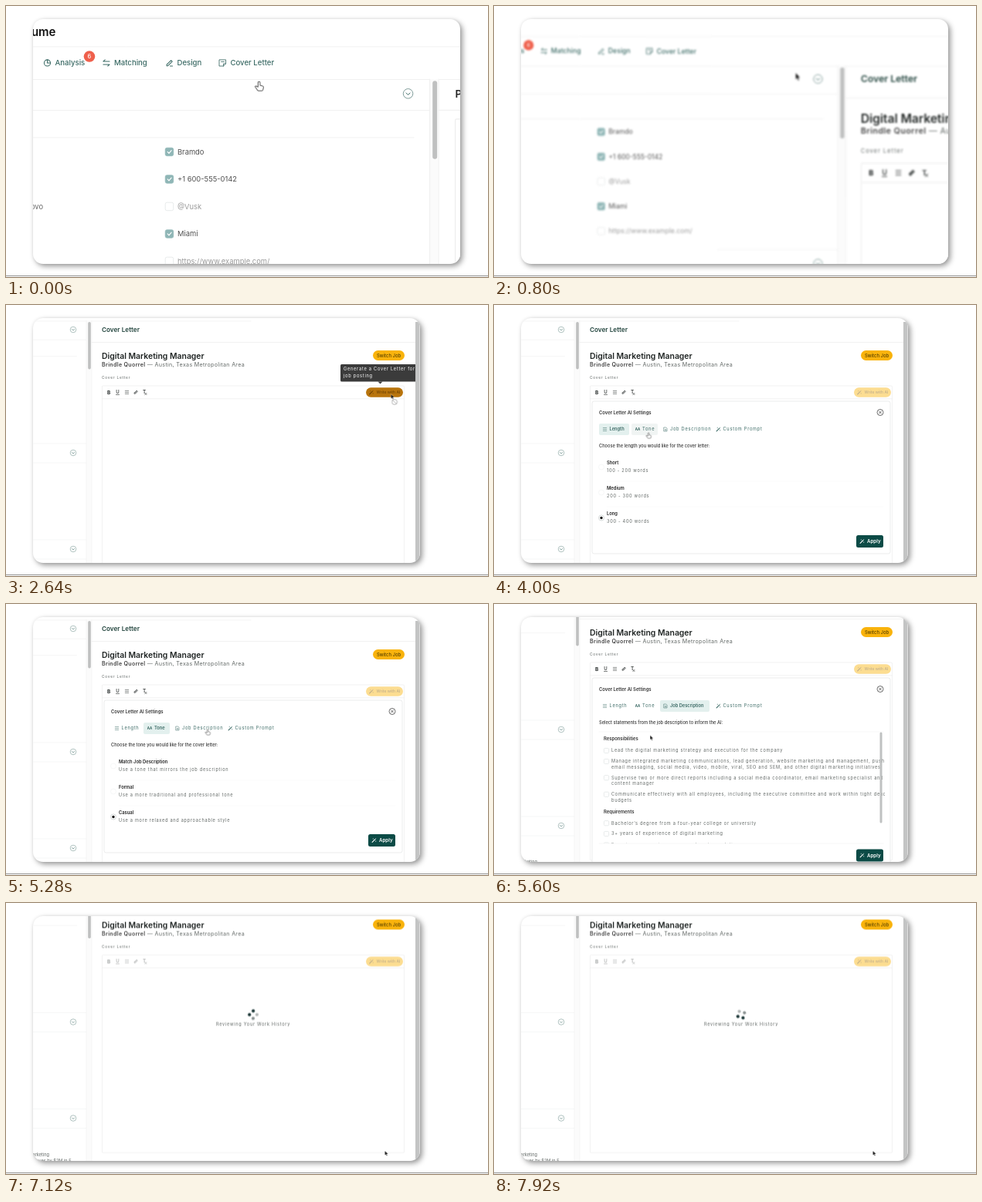
An HTML page for the animation above (8000 ms loop, 624 by 352 pixels).

```html
<!DOCTYPE html>
<html lang="en">
<head>
<meta charset="utf-8">
<title>Cover letter settings</title>
<style>
  html, body { margin: 0; width: 100%; height: 100%; overflow: hidden; background: #fff; }
  body { position: relative; }
  #card {
    position: absolute; left: 35px; top: 17px; width: 553px; height: 318px;
    overflow: hidden; border-radius: 13px; background: #fff;
    box-shadow: 3px 3px 7px rgba(0,0,0,.4), 0 0 4px rgba(0,0,0,.06);
    animation: narrow 8s linear infinite;
  }
  #floor { position: absolute; left: 0; top: 350px; width: 100%; height: 1px; background: #929292; }
  svg { position: absolute; left: -35px; top: -17px; }
  text { font-family: Inter, "Open Sans", sans-serif; white-space: pre; }
  .note { letter-spacing: .045em; }
  #camera { animation: zoom 8s linear infinite, smear 8s linear infinite; }
  #scroll { animation: scroll 8s ease-in-out infinite; }
  #cursor { animation: point 8s ease-in-out infinite; }
  #spinner { animation: spin 8s linear infinite; }

  /* One percent is 80 ms. */
  @keyframes narrow {
    0%, 15.2% { width: 553px; }
    16% { width: 515px; }
    17%, 100% { width: 501px; }
  }
  @keyframes zoom {
    0%, 6.5% { transform: translate(377px,61px) scale(1.65); animation-timing-function: ease-in-out; }
    17%, 100% { transform: translate(0,0) scale(1); }
  }
  @keyframes smear {
    0%, 7% { filter: blur(0); }
    9%, 16% { filter: blur(.6px); }
    19%, 100% { filter: blur(0); }
  }
  @keyframes scroll {
    0%, 68% { transform: translateY(0); }
    71%, 100% { transform: translateY(-37.5px); }
  }
  @keyframes point {
    0% { transform: translate(-30px,22.6px); }
    4%, 7% { transform: translate(-38px,9px); }
    15%, 18% { transform: translate(320px,69px); }
    27%, 35% { transform: translate(498.5px,116px); }
    42%, 44% { transform: translate(139px,274px); }
    49%, 51% { transform: translate(200px,166px); }
    57%, 59% { transform: translate(139px,274px); }
    65%, 68% { transform: translate(261px,163px); }
    72%, 75% { transform: translate(144.5px,178px); }
    77%, 79% { transform: translate(144.5px,193.5px); }
    83%, 85% { transform: translate(487px,316px); }
    88%, 100% { transform: translate(490.5px,322px); }
  }
  @keyframes spin {
    0%, 85% { transform: rotate(39deg); }
    100% { transform: rotate(399deg); }
  }
</style>
</head>
<body>
<div id="card"><svg id="stage" width="624" height="352" viewBox="0 0 624 352"></svg></div>
<div id="floor"></div>
<script>
const INK = '#1f2423', TEAL = '#3b6a65', GREY = '#626866', EDGE = '#ededed', YELLOW = '#f9b30c';

// Shape helpers; text is placed by its vertical centre.
const text = (x, y, s, size = 5.6, weight = 400, fill = GREY, anchor = 'start') =>
  `<text x="${x}" y="${y + size * .35}" font-size="${size}" font-weight="${weight}" fill="${fill}" text-anchor="${anchor}">${s}</text>`;
const note = (...args) => `<g class="note">${text(...args)}</g>`;
const rect = (x, y, w, h, fill, r = 0, stroke = 'none') =>
  `<rect x="${x}" y="${y}" width="${w}" height="${h}" rx="${r}" fill="${fill}" stroke="${stroke}" stroke-width=".7"/>`;
const path = (d, stroke = EDGE, width = .7, fill = 'none') =>
  `<path d="${d}" stroke="${stroke}" stroke-width="${width}" fill="${fill}" stroke-linecap="round" stroke-linejoin="round"/>`;
const dot = (x, y, r, fill, stroke = 'none', width = .7) =>
  `<circle cx="${x}" cy="${y}" r="${r}" fill="${fill}" stroke="${stroke}" stroke-width="${width}"/>`;
const at = (x, y, s, scale = 1) => `<g transform="translate(${x} ${y}) scale(${scale})">${s}</g>`;

// Visibility flips at each listed percentage, starting hidden.
const rules = [];
const on = (times, s) => {
  const name = 'on' + rules.length;
  const steps = times.map((p, i) => `${p}%{opacity:${i % 2 ? 0 : 1}}`).join('');
  rules.push(`@keyframes ${name}{0%{opacity:0}${steps}}`);
  return `<g style="animation:${name} 8s step-end infinite">${s}</g>`;
};

// Icons, centred on 0,0.
const icons = {
  lines: c => path('M-2.2 -2H2.2M-2.2 0H2.2M-2.2 2H2.2', c, .5),
  letters: c => text(0, 0, 'AA', 4.3, 700, c, 'middle'),
  page: c => path('M-1.9 -2.5H.8L2 -1.2V2.5H-1.9ZM-.8 .2H.9M-.8 1.3H.9', c, .5),
  note: c => path('M-2.4 -2.4H2.4V.6L.6 2.4H-2.4ZM.6 2.4V.6H2.4M-1.1 -.9H1.1', c, .5),
  wand: c => path('M-2.4 2.4L1.4 -1.4', c, 1.1) + path('M-1.2 -2.4V-1.6M2.2 .8V1.6M2.2 -2.4V-2.2', c, .6),
  pie: c => dot(0, 0, 2.4, 'none', c, .6) + path('M0 -2.4V0H2.4', c, .6),
  swap: c => path('M2.4 -1.2H-2.4L-1 -2.4M-2.4 1.2H2.4L1 2.4', c, .6),
  pencil: c => path('M-2 1.3L1.3 -2L2.2 -1.1L-1.1 2.2H-2ZM.6 2.4H2.4', c, .6),
  link: c => path('M-.6 .6L.6 -.6M-.2 -1L.8 -2Q2 -2.2 2 -.8L1 .2M.2 1L-.8 2Q-2 2.2 -2 .8L-1 -.2', c, .8),
};
const icon = (name, x, y, c = TEAL, scale = 1) => at(x, y, icons[name](c), scale);
const chevron = y => dot(87, y, 3.8, '#fff', '#7d9a97', .6) + path(`M85.5 ${y - .5}L87 ${y + 1}L88.5 ${y - .5}`, TEAL, .6);
const checkbox = (x, y, size, checked) =>
  rect(x - size / 2, y - size / 2, size, size, checked ? '#8fb6b6' : '#fff', size * .2, checked ? '#8fb6b6' : '#dfe2e2') +
  (checked ? path(`M${x - size * .22} ${y}l${size * .17} ${size * .18}l${size * .3} ${size * -.35}`, '#fff', size * .11) : '');

// Resume form, laid out at its enlarged size.
function resumeForm() {
  const nav = [['pie', 53.5, 'Analysis', 63.5], ['swap', 130, 'Matching', 140],
    ['pencil', 211.5, 'Design', 221.5], ['note', 280.5, 'Cover Letter', 290.5]];
  const rows = [['Bramdo', 1], ['+1 600-555-0142', 1], ['@Vusk', 0], ['Miami', 1], ['https://www.example.com/', 0]];
  const form = text(64.5, 33.8, 'Resume', 15, 600, '#111', 'end') +
    path('M-100 53H900M-100 95.5H900M-100 135.5H549M-100 171H528', '#f1f1f1', 1) +
    nav.map(([i, x, label, tx]) => icon(i, x, 74, TEAL, 1.7) + text(tx, 74, label, 9.6, 500, TEAL)).join('') +
    dot(108, 65.6, 7.3, '#ef604c') + text(108, 65.6, '6', 7.5, 500, '#fff', 'middle') +
    rows.map(([label, checked], i) => {
      const y = 189.5 + i * 35.5;
      return checkbox(211.5, y, 10.5, checked) + text(222, y, label, 9.4, 400, checked ? '#505050' : '#9a9a9a');
    }).join('') + text(48, 261, 'ovo', 9.3, 400, '#666', 'end');
  return at(-228.5, -37, form, 1 / 1.65);
}

function leftPane() {
  return resumeForm() + path('M0 180H104M0 205H104M0 305H104M0 330H104', '#f3f4f4') +
    [32, 192, 317].map(chevron).join('') +
    text(56, 364.5, 'marketing', 5.6, 400, GREY, 'end') + text(84.5, 372.5, 'revenues by $2M in F', 5.6, 400, GREY, 'end') +
    rect(104, 20.6, 7, 400, '#fbfbfb') + path('M104 20.6V420M111 20.6V420', '#f0f0f0', .6) +
    rect(106.2, 22, 3.6, 61.5, '#bfc0c0', 1.8);
}

function aiButton(fill, ink) {
  return rect(466, 107.3, 48, 12.5, fill, 6.25) + icon('wand', 473, 113.6, ink) + text(479.5, 113.6, 'Write with AI', 5.1, 500, ink);
}

function editor() {
  const tools = text(133, 113.4, 'B', 6.4, 700, INK, 'middle') +
    text(144.5, 113, 'U', 6, 500, INK, 'middle') + path('M142.5 116.5H146.5', INK, .6) +
    icon('lines', 156.5, 113.4, INK) + icon('link', 168, 113.4, INK) +
    text(179, 113.2, 'T', 6.4, 500, INK, 'middle') + path('M179.8 114.4L182 116.6M182 114.4L179.8 116.6', INK, .6);
  return text(124, 32, 'Cover Letter', 8.2, 600, '#24463f') + path('M111 48.5H530') +
    text(124, 66.1, 'Digital Marketing Manager', 10.4, 600, INK) +
    `<text class="note" x="124" y="79.7" font-size="7.1" fill="${GREY}"><tspan font-weight="600" fill="#444">Brindle Quorrel</tspan> — Austin, Texas Metropolitan Area</text>` +
    rect(475, 59, 41, 13, YELLOW, 6.5) + text(495.5, 65.6, 'Switch Job', 5.9, 500, '#5a4300', 'middle') +
    note(124, 94.7, 'Cover Letter', 4.9) +
    rect(124.4, 105, 391, 257, '#fff', 1, EDGE) + path('M124.4 121.8H515.4') +
    on([0, 85], tools) + on([85], `<g opacity=".4">${tools}</g>`) +
    on([0, 27], aiButton(YELLOW, '#5a4300')) +
    on([27, 35], aiButton('#b8740c', '#6e4304')) +
    on([35], `<g opacity=".45">${aiButton(YELLOW, '#7a5200')}</g>`) +
    on([29, 35], rect(433, 77, 102, 22.5, '#3b3b3b', 1.5) + path('M481.5 99.5h6l-3 3z', 'none', 0, '#3b3b3b') +
      note(437, 83.5, 'Generate a Cover Letter for this', 5.7, 400, '#fff') + note(437, 92.5, 'job posting', 5.7, 400, '#fff'));
}

// Settings dialog with one tab active.
const tabs = [['lines', 143.5, 'Length', 136, 39], ['letters', 186, 'Tone', 178, 34],
  ['page', 222, 'Job Description', 215, 64], ['wand', 290.5, 'Custom Prompt', 283, 63]];
function dialog(active, bottom, prompt, body) {
  const applyY = bottom - 24;
  return rect(127, 125, 386, bottom - 125, '#fff', 2.5, '#e2e4e4') +
    text(136, 139.5, 'Cover Letter AI Settings', 5.9, 600, '#333') +
    dot(500, 139.5, 4, '#fff', '#333', .7) + path('M498.5 138l3 3M501.5 138l-3 3', '#333', .7) +
    tabs.map(([i, x, label, left, width], n) =>
      (n === active ? rect(left, 154, width, 15, '#e3f0ee', 2) : '') + icon(i, x, 161.5) +
      (n === active ? text : note)(x + 6, 161.5, label, 5.7, n === active ? 600 : 400, TEAL)).join('') +
    text(136, 183.2, prompt, 5.7, 500, '#333') + body +
    rect(469, applyY, 35, 16, '#0c4b46', 2.5) + icon('wand', 476.5, applyY + 8, '#fff') +
    text(483, applyY + 8, 'Apply', 6.2, 600, '#fff');
}

const radio = (y, picked) => dot(139, y, 3.5, '#fff', picked ? '#c5cccb' : '#f3f4f4', .7) + (picked ? dot(139, y, 1.7, '#111') : '');
function choices(list, pickTime) {
  return list.map(([title, detail], i) => {
    const y = 205 + i * 33;
    return text(146, y, title, 5.8, 600, '#222') + note(146, y + 10, detail) + radio(y + 5.5, false) +
      (i < 2 ? path(`M146 ${y + 24}H504`, '#f5f5f5', .5) : '');
  }).join('') + on([0, pickTime], radio(243.5, true)) + on([pickTime], radio(276.5, true));
}

function statements() {
  const items = [
    [219.5, 'Lead the digital marketing strategy and execution for the company'],
    [233.5, 'Manage integrated marketing communications, lead generation, website marketing and management, push HTML', 'email messaging, social media, video, mobile, viral, SEO and SEM, and other digital marketing initiatives'],
    [254.7, 'Supervise two or more direct reports including a social media coordinator, email marketing specialist and a web', 'content manager'],
    [276.3, 'Communicate effectively with all employees, including the executive committee and work within tight deadlines and', 'budgets'],
    [313.7, 'Bachelor’s degree from a four-year college or university'],
    [327.5, '3+ years of experience of digital marketing'],
    [342, 'Experience managing agency and partner relations']];
  const picked = (y, w, h, time) => on([time], rect(150, y - 4.7, w, h, '#e1efed', 1) + checkbox(145.5, y, 6.2, true));
  return '<clipPath id="list"><rect x="136" y="195" width="370" height="145"/></clipPath><g clip-path="url(#list)">' +
    items.map(([y]) => checkbox(145.5, y, 6.2, false)).join('') +
    picked(219.5, 195.5, 9.4, 74) + picked(233.5, 331, 17.5, 79) +
    items.map(([y, a, b = '']) => note(152, y, a) + note(152, y + 7.8, b)).join('') +
    text(142, 204.2, 'Responsibilities', 5.9, 600, '#333') + text(142, 298.7, 'Requirements', 5.9, 600, '#333') +
    '</g>' + path('M136 195H504M136 340H504', '#f2f2f2', .6) + rect(499.5, 195.5, 3, 118, '#bfc1c1', 1.5);
}

function dialogs() {
  return on([35, 51], dialog(0, 323, 'Choose the length you would like for the cover letter:',
      choices([['Short', '100 - 200 words'], ['Medium', '200 - 300 words'], ['Long', '300 - 400 words']], 43)) +
      on([48], rect(178, 154, 34, 15, 'rgba(47,98,93,.07)', 2))) +
    on([51, 67], dialog(1, 323, 'Choose the tone you would like for the cover letter:',
      choices([['Match Job Description', 'Use a tone that mirrors the job description'],
        ['Formal', 'Use a more traditional and professional tone'],
        ['Casual', 'Use a more relaxed and approachable style']], 58))) +
    on([67, 85], dialog(2, 371.5, 'Select statements from the job description to inform the AI:', statements()));
}

function loading() {
  const shades = ['#1f3a3a', '#1f3a3a', '#b4b8b8', '#8a9292'];
  const dots = shades.map((c, i) => {
    const a = (45 + 90 * i) * Math.PI / 180;
    return dot(4.9 * Math.cos(a), 4.9 * Math.sin(a), 2.1, c);
  }).join('');
  return on([85], at(320, 182.5, `<g id="spinner">${dots}</g>`) +
    note(320, 195, 'Reviewing Your Work History', 5.6, 400, GREY, 'middle'));
}

const preview = text(124, 32, 'Preview', 8.2, 600, '#222') + path('M111 45H530') + rect(124, 52, 391, 400, '#fff', 1, EDGE);
const hand = at(0, 0, path('M-.9 .8a.9 .9 0 0 1 1.8 0v2.4l2.2 .6q1.1 .4 .9 1.5l-.5 2.2q-.2 .7-.9 .7h-3q-.7 0-1-.5l-2-3q-.3-.9 .7-.8l1.8 .8z', '#555', .7, '#fff'), .87);
const arrow = path('M0 0V5.6L1.3 4.5L2.2 6.6L3.2 6.1L2.3 4.1H4Z', '#fff', .3, '#111');
const blocked = dot(4.5, 10, 3.4, '#fff', '#999', .7) + path('M2.2 7.7L6.8 12.3', '#999', .7);

document.getElementById('stage').innerHTML = `<g id="camera">
  <g id="scroll">${leftPane()}${on([0, 5], preview)}${on([5], editor())}${dialogs()}${loading()}
    ${rect(530, 22, 5.5, 360, '#c3c4c4')}</g>
  <g id="cursor">${on([0, 8, 41, 45, 48, 52, 56, 60, 63, 68, 72, 86], hand)}
    ${on([8, 41, 45, 48, 52, 56, 60, 63, 68, 72, 86], arrow)}${on([31, 35], blocked)}</g>
</g>`;
const sheet = document.createElement('style');
sheet.textContent = rules.join('\n');
document.head.append(sheet);
</script>
</body>
</html>
```
